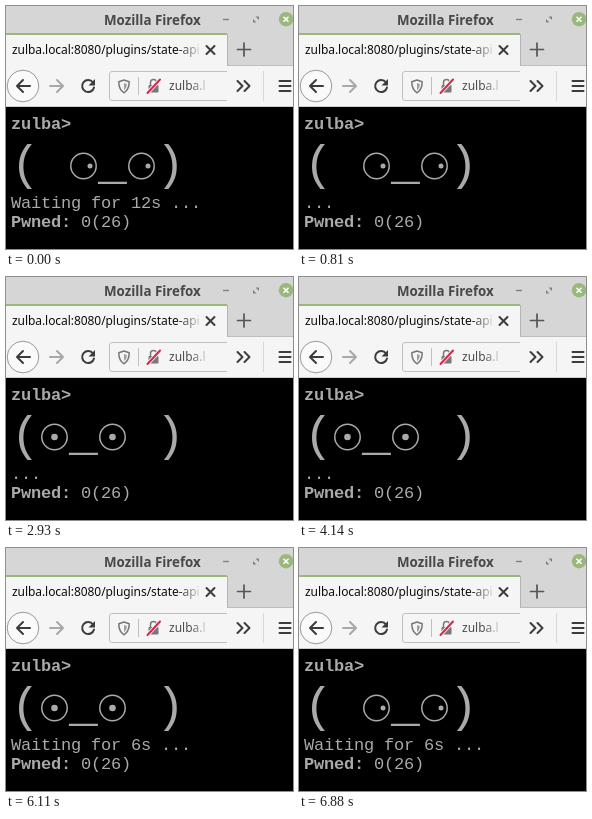
Animation, 287 px wide and 243 px high, one loop 8 s. Source, as an HTML page:

```html
<!DOCTYPE html>
<html lang="en">
<head>
<meta charset="utf-8">
<title>Terminal face</title>
<style>
  html, body { margin: 0; width: 100%; height: 100%; overflow: hidden; background: #000; }
  svg { display: block; width: 287px; height: 243px; }

  .ui { font: 12px "Noto Sans", "Open Sans", sans-serif; letter-spacing: -.06px; fill: #0c0c0d; }
  .title { font-size: 13.33px; font-weight: 700; letter-spacing: 0; fill: #484848; }
  .url { letter-spacing: 0; fill: #4a4a4f; }
  .term { font: 17px "Liberation Mono", monospace; letter-spacing: -.2px; fill: #aaa; }
  .bold { font-weight: 700; }
  .big { font: 48px "Liberation Mono", monospace; fill: #aaa; }
  .line { fill: none; stroke: #3c3c3e; stroke-width: 2; stroke-linecap: round; stroke-linejoin: round; }
  .grey { stroke: #77777a; stroke-width: 1.5; }

  .step { animation: 8s step-end infinite; }
  .right { animation-name: right; }
  .left { animation-name: left; }
  .long { animation-name: long; }
  .dots { animation-name: dots; }
  .short { animation-name: short; }
  @keyframes right { 0% { opacity: 1 } 36.625% { opacity: 0 } 86%, 100% { opacity: 1 } }
  @keyframes left { 0% { opacity: 0 } 36.625% { opacity: 1 } 86%, 100% { opacity: 0 } }
  @keyframes long { 0% { opacity: 1 } 10.125%, 100% { opacity: 0 } }
  @keyframes dots { 0% { opacity: 0 } 10.125% { opacity: 1 } 61.875%, 100% { opacity: 0 } }
  @keyframes short { 0% { opacity: 0 } 61.875%, 100% { opacity: 1 } }
</style>
</head>
<body>
<svg viewBox="0 0 287 243">
  <defs>
    <linearGradient id="fade">
      <stop offset="0" stop-color="#f5f5f5" stop-opacity="0"/>
      <stop offset="1" stop-color="#f5f5f5"/>
    </linearGradient>
    <circle id="ring" r="12.7" fill="none" stroke="#aaa" stroke-width="1.5"/>
    <g id="ahead"><use href="#ring"/><circle cx="6.5" r="2.5" fill="#aaa"/></g>
    <g id="center"><use href="#ring"/><circle r="3.3" fill="#aaa"/></g>
  </defs>

  <!-- title bar -->
  <rect width="287" height="60" fill="#d6d6d6"/>
  <text class="ui title" x="98" y="18.5">Mozilla Firefox</text>
  <path d="M217 13.5h6" stroke="#808080" stroke-width="1.4"/>
  <path d="M249.5 10.500h3.500v3.500zM247 13v3.500h3.500z" fill="#808080"/>
  <circle cx="280" cy="13.200" r="7.200" fill="#9ab87c"/>
  <path d="M277.5 10.700l5 5m0-5l-5 5" stroke="#fff" stroke-width="1.5"/>

  <!-- tabs -->
  <rect y="28" width="221" height="32" fill="#f5f5f5"/>
  <rect y="27" width="221" height="2" fill="#9ab87c"/>
  <path d="M221.500 28V60" stroke="#b4b4b4"/>
  <path d="M222 59.500H287" stroke="#bdbdbd"/>
  <text class="ui" x="6" y="48">zulba.local:8080/plugins/state-api</text>
  <rect x="170" y="32" width="27" height="24" fill="url(#fade)"/>
  <path class="line" d="M200.500 40l8 8m0-8l-8 8"/>
  <path class="line" style="stroke:#555;stroke-width:1.7" d="M231.500 43.500h13m-6.500-6.500v13"/>

  <!-- toolbar -->
  <rect y="60" width="287" height="41" fill="#f5f5f5"/>
  <path d="M0 100.500H287" stroke="#ccc"/>
  <circle cx="17" cy="80" r="15.800" fill="#fafafa" stroke="#999"/>
  <path class="line" d="M24 80H11m6-6l-6 6 6 6"/>
  <path class="line" style="stroke:#a8a8aa" d="M44 80h13m-6-6l6 6-6 6"/>
  <path class="line" d="M87 76.500a6 6 0 1 0 1 5"/>
  <path d="M89 73v6.500h-6.500z" fill="#3c3c3e"/>

  <path d="M221 65.500H106q-2.500 0-2.500 2.500v24q0 2.500 2.500 2.500H221" fill="#f5f5f5" stroke="#c0c0c0"/>
  <path class="line grey" d="M118 74l5.200 1.800c0 5.500-1 8.500-5.200 11c-4.200-2.500-5.200-5.500-5.200-11z"/>
  <path d="M118 77l2.800 1c-.1 3-.8 4.700-2.800 6z" fill="#a0a0a2"/>
  <path d="M132.500 71v18" stroke="#c0c0c0"/>
  <rect x="142.500" y="79" width="10" height="7.500" rx="1" fill="#77777a"/>
  <path class="line grey" d="M144.500 79v-2.500a3 3 0 0 1 6 0v2.500"/>
  <path d="M141 87.500L154.500 73" stroke="#f5f5f5" stroke-width="4"/>
  <path class="line" style="stroke:#d7264a" d="M141.500 87L154 73.500"/>
  <text class="ui url" x="163" y="84">zulba.l</text>
  <rect x="184" y="68" width="20" height="24" fill="url(#fade)"/>
  <path class="line" d="M231.500 75l5 5-5 5m7-10l5 5-5 5"/>
  <path d="M257.500 65v30" stroke="#d8d8d8"/>
  <path class="line" d="M273.500 75h11m-11 5h11m-11 5h11"/>

  <!-- page -->
  <rect y="101" width="287" height="142"/>
  <text class="term bold" x="5" y="123">zulba&gt;</text>

  <text class="big" x="5" y="173">(</text>
  <text class="big" x="150" y="173">)</text>
  <g class="step right">
    <use href="#ahead" x="77.500" y="160"/>
    <text class="big" x="92" y="173">_</text>
    <use href="#ahead" x="135.500" y="160"/>
  </g>
  <g class="step left">
    <use href="#center" x="48.500" y="160"/>
    <text class="big" x="63" y="173">_</text>
    <use href="#center" x="106.500" y="160"/>
  </g>

  <text class="term step long" x="5" y="202">Waiting for 12s ...</text>
  <text class="term step dots" x="5" y="202">...</text>
  <text class="term step short" x="5" y="202">Waiting for 6s ...</text>
  <text class="term" x="5" y="221"><tspan class="bold">Pwned:</tspan> 0(26)</text>
</svg>
</body>
</html>
```
